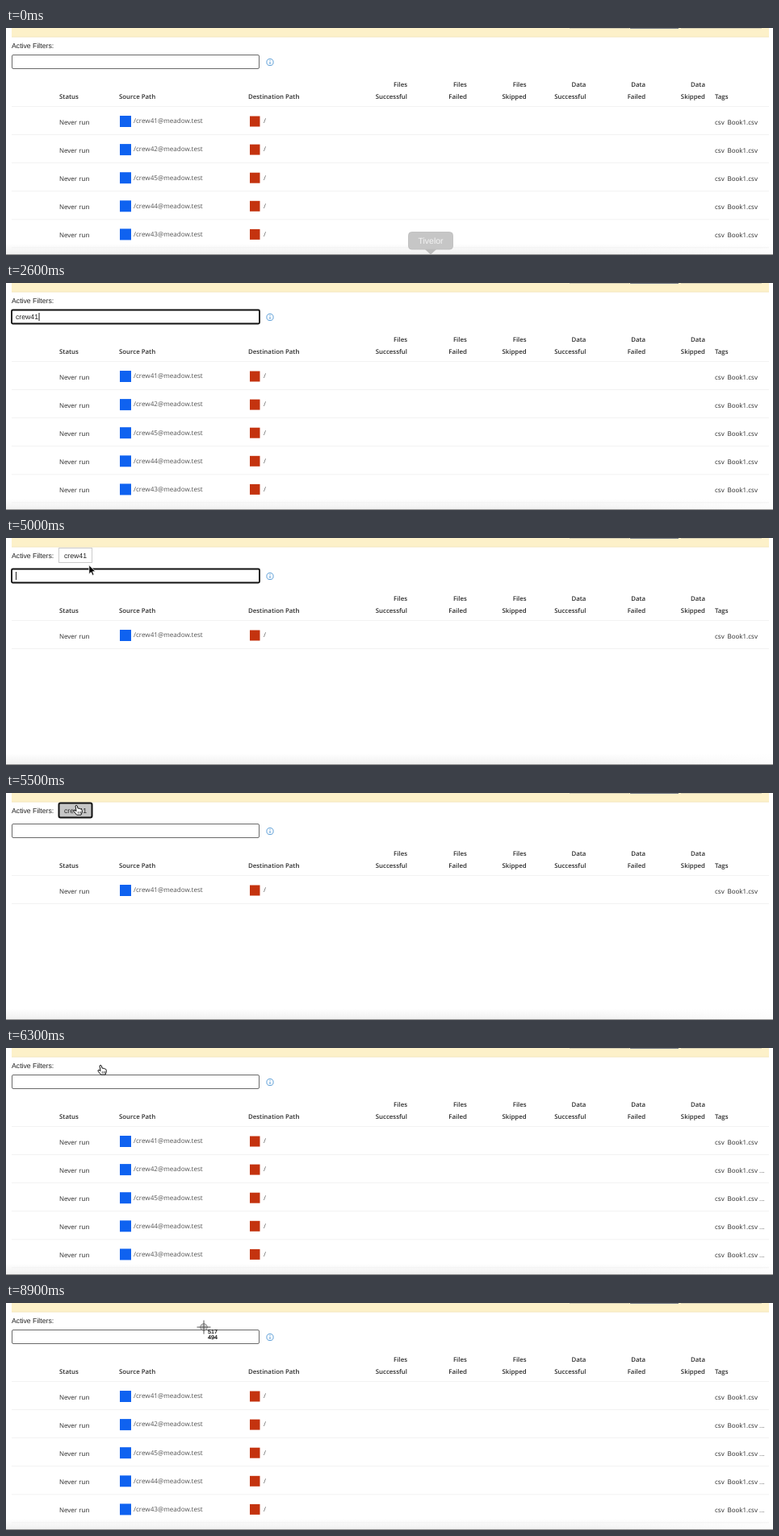
Write an HTML page that moves like this. It is 950 px wide and 282 px high and loops after 9100 ms.

```html
<!DOCTYPE html>
<html lang="en">
<head>
<meta charset="utf-8">
<title>Filter list</title>
<style>
  html, body { margin: 0; width: 100%; height: 100%; overflow: hidden; background: #fff; }
  svg { display: block; }
  text { text-rendering: geometricPrecision; }
  .ui { font-family: "Liberation Sans", Arial, sans-serif; font-size: 8.7px; fill: #222; }
  .cell { font-family: "Open Sans", "Noto Sans", sans-serif; font-size: 8px; fill: #2b2b2b; }
  .path { font-size: 8.1px; fill: #555; }
  .head { font-family: "Open Sans", "Noto Sans", sans-serif; font-size: 7.85px; font-weight: 600; fill: #2b2b2b; }
  .end { text-anchor: end; }
  .mid { text-anchor: middle; }
  .tip { font-family: "Liberation Sans", Arial, sans-serif; font-size: 10.5px; fill: #f4f4f4; text-anchor: middle; }
  .coord { font-family: "Liberation Sans", Arial, sans-serif; font-size: 7.2px; fill: #000; stroke: #000; stroke-width: .15; }
</style>
</head>
<body>
<svg id="stage" width="950" height="282" viewBox="0 0 950 282">
  <defs>
    <linearGradient id="shade" x2="0" y2="1">
      <stop offset="0" stop-color="#fff"/>
      <stop offset="1" stop-color="#f0f0f0"/>
    </linearGradient>
    <linearGradient id="fade">
      <stop offset="0" stop-color="#fff" stop-opacity="0"/>
      <stop offset="1" stop-color="#fff" stop-opacity=".8"/>
    </linearGradient>
  </defs>
</svg>
<script>
const LOOP = 9100;
const WORD = "crew41";
const stage = document.getElementById("stage");

function add(parent, tag, attrs, text) {
  const el = document.createElementNS("http://www.w3.org/2000/svg", tag);
  setAll(el, attrs);
  if (text !== undefined) el.textContent = text;
  parent.append(el);
  return el;
}
function setAll(el, attrs) {
  for (const k in attrs) el.setAttribute(k, attrs[k]);
}
const group = (parent = stage) => add(parent, "g", {});
const rect = (p, x, y, width, height, fill, more) =>
  add(p, "rect", { x, y, width, height, fill, ...more });
const label = (p, x, y, cls, text) => add(p, "text", { x, y, class: cls }, text);
const line = (p, d, stroke, width = 1) =>
  add(p, "path", { d, stroke, "stroke-width": width, fill: "none" });
const show = (el, on) => { el.style.display = on ? "" : "none"; };
const move = (el, x, y) => el.setAttribute("transform", `translate(${x} ${y})`);

// Top banner and page bottom
rect(stage, 7, 0, 938, 11, "#fdf1c9");
line(stage, "M7 11H945", "#f3e6bb");
line(stage, "M698 .5H772M836 .5H936", "#d3ccb2");
line(stage, "M773 .5H833", "#7b8088");
rect(stage, 0, 268, 950, 13, "url(#shade)");
rect(stage, 720, 268, 230, 13, "url(#fade)");
line(stage, "M0 281.5H950", "#8f8f8f");
label(stage, 7, 25.2, "ui", "Active Filters:");

// Everything below the filter bar shifts down when a filter is active
const body = group();
const box = rect(body, 7.5, 33.5, 306, 17, "#fff", { rx: 1.5 });
const boxLook = {
  idle: { x: 7.5, width: 306, stroke: "#6a6a6a", "stroke-width": 1 },
  focus: { x: 7, width: 307, stroke: "#111", "stroke-width": 1.8 }
};
const typed = label(body, 12, 45, "ui", "");
const caret = rect(body, 12, 37, 1, 10, "#222");
add(body, "circle", { cx: 327, cy: 42.5, r: 4.1, fill: "#fff", stroke: "#4a93d2", "stroke-width": .9 });
line(body, "M327 41.9V45M327 40V41", "#4a93d2");

[[66, "Status"], [140, "Source Path"], [300, "Destination Path"], [878, "Tags"]]
  .forEach(([x, s]) => label(body, x, 88, "head", s));
["Successful", "Failed", "Skipped"].forEach((s, i) =>
  ["Files", "Data"].forEach((kind, j) => {
    const x = 497 + 73.8 * (i + 3 * j);
    label(body, x, 73, "head end", kind);
    label(body, x, 88, "head end", s);
  }));
line(body, "M7 97.5H945", "#f2f2f2");

const rows = [1, 2, 5, 4, 3].map((n, i) => {
  const g = group(body);
  move(g, 0, i * 35.1);
  label(g, 66, 119.9, "cell", "Never run");
  rect(g, 141, 109, 14, 14, "#0f62f0");
  label(g, 158, 118.4, "cell path", `/crew4${n}@meadow.test`);
  rect(g, 302, 109.5, 12.5, 13, "#c4330f");
  label(g, 319, 118.4, "cell path", "/");
  label(g, 878, 119.9, "cell", "csv");
  label(g, 893.5, 119.9, "cell", "Book1.csv");
  line(g, "M7 132.5H945", "#f2f2f2");
  return g;
});
const dots = rows.slice(1).map(g => label(g, 933, 119.9, "cell path", "..."));

// Filter buttons
function button(x, w, text) {
  const g = group();
  const face = rect(g, x + .5, 12.5, w - 1, 18, "#fff");
  label(g, x + w / 2, 24.7, "ui mid", text);
  const press = on => setAll(face, on
    ? { fill: "#c6c6c6", stroke: "#111", "stroke-width": 2, rx: 2 }
    : { fill: "#fff", stroke: "#cbcbcb", "stroke-width": 1, rx: 0 });
  press(false);
  return { g, press };
}
const chip = button(65, 42, WORD);
const back = button(65, 37, "Back");
const save = button(168, 57, "Save Filter");
const remove = button(101, 68, "Remove Filter");
const options = [back, save, remove];

// Dock label
const tip = group();
rect(tip, 498.5, 253.5, 55, 21.5, "#c6c6c6", { rx: 4, stroke: "#bcbcbc", "stroke-width": .8 });
add(tip, "path", { d: "M519 275H533L526 281.5Z", fill: "#bdbdbd" });
label(tip, 526, 268, "tip", "Tivelor");

// Pointers, each with its hot spot at 0,0
const arrow = group();
add(arrow, "path", {
  d: "M0 0V11.2L2.6 8.8L4.4 12.8L6.2 12L4.5 8.1H8Z",
  fill: "#000", stroke: "#fff", "stroke-width": .8
});
const beam = group();
const beamPath = "M-2.3 -5.5Q0 -5.5 0 -4V4Q0 5.5 -2.3 5.5M2.3 -5.5Q0 -5.5 0 -4M0 4Q0 5.5 2.3 5.5M-1.5 1.5H1.5";
line(beam, beamPath, "#fff", 2.2);
line(beam, beamPath, "#111", 1.1);
const hand = group();
add(hand, "path", {
  d: "M-2 -5Q-.8 -6.4 .3 -5L1 -1.8Q2 -2.6 2.9 -1.5Q4 -2.1 4.7 -.9Q6 -1.2 6.2 .4V3L5 6.2H-.4L-4 1.8Q-4.4 .2 -2.9 .3L-1 1.6Z",
  fill: "#fff", stroke: "#111", "stroke-width": 1
});
line(hand, "M1.2 2V4.6M2.9 2V4.6M4.5 2V4.6", "#111", .6);
const cross = group();
add(cross, "circle", { r: 4.3, fill: "#999", "fill-opacity": .45, stroke: "#777", "stroke-width": .8 });
line(cross, "M-8.5 0H8.5M0 -8.5V8.5", "#444", .9);
label(cross, 5, 7.8, "coord", "517");
label(cross, 5, 15, "coord", "494");

const pointers = { arrow, beam, hand, cross };

// time, x, y of the pointer
const track = [
  [100, 524, 286], [600, 112, 41], [800, 108, 38], [4900, 108, 38],
  [5200, 88, 21], [5700, 88, 21], [6000, 118, 27], [6400, 118, 27], [6800, 245, 30]
];
// time, pointer shown from then on
const looks = [
  [0, ""], [200, "arrow"], [600, "beam"], [1700, ""], [4900, "beam"],
  [5000, "arrow"], [5100, "hand"], [6400, "arrow"], [7200, "cross"]
];
const caretOn = [[800, 1300], [1700, 2900], [3600, 4100], [4700, 5300]];

const within = (t, a, b) => t >= a && t < b;
const ease = k => k * k * (3 - 2 * k);

function place(t) {
  const i = track.findIndex(p => p[0] > t);
  if (i === 0) return track[0].slice(1);
  if (i < 0) return track[track.length - 1].slice(1);
  const [t0, x0, y0] = track[i - 1], [t1, x1, y1] = track[i];
  const k = ease((t - t0) / (t1 - t0));
  return [x0 + (x1 - x0) * k, y0 + (y1 - y0) * k];
}

function draw(t) {
  const filtered = within(t, 2900, 6300);
  move(body, 0, filtered ? 5 : 0);
  rows.forEach((g, i) => show(g, !filtered || i === 0));
  dots.forEach(d => show(d, t >= 6300));

  setAll(box, within(t, 800, 5500) ? boxLook.focus : boxLook.idle);
  const count = within(t, 1700, 2900) ? Math.floor((t - 1700) / 180) + 1 : 0;
  typed.textContent = WORD.slice(0, count);
  caret.setAttribute("x", 12 + (count ? typed.getComputedTextLength() + .5 : 0));
  show(caret, caretOn.some(([a, b]) => within(t, a, b)));

  show(chip.g, within(t, 2900, 5700));
  chip.press(t >= 5500);
  options.forEach(b => show(b.g, within(t, 5700, 6300)));
  remove.press(t >= 6100);

  tip.style.opacity = Math.max(0, 1 - t / 400);
  const name = looks.filter(l => l[0] <= t).pop()[1];
  const [x, y] = place(t);
  for (const k in pointers) {
    show(pointers[k], k === name);
    move(pointers[k], x, y);
  }
}

const start = performance.now();
function tick() {
  const t = (performance.now() - start) % LOOP;
  draw(Math.floor(t / 100) * 100);
  requestAnimationFrame(tick);
}
tick();
</script>
</body>
</html>
```
